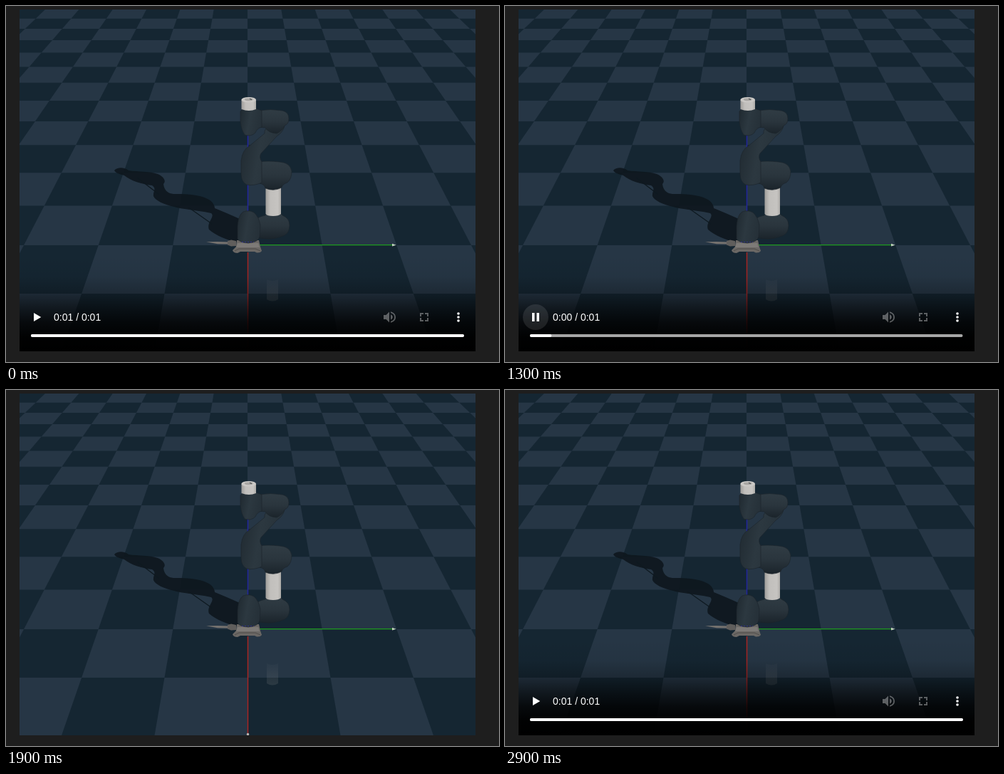
Animation of 692x500 px, one loop 4300 ms. Source, as an HTML page:

```html
<!DOCTYPE html>
<html lang="en">
<head>
<meta charset="utf-8">
<title>Robot arm player</title>
<style>
html, body { margin: 0; width: 100%; height: 100%; overflow: hidden; background: #1e1e1e; }
svg { display: block; width: 692px; height: 500px; }
text { font: 14px "Liberation Sans", Arial, sans-serif; fill: #fff; }
</style>
</head>
<body>
<svg viewBox="0 0 692 500" xmlns="http://www.w3.org/2000/svg">
  <defs>
    <clipPath id="view"><rect x="19" y="5" width="640" height="480"/></clipPath>
    <linearGradient id="shade" gradientUnits="userSpaceOnUse" x1="0" y1="350" x2="0" y2="485">
      <stop offset="0" stop-opacity="0"/>
      <stop offset=".22" stop-opacity=".05"/>
      <stop offset=".4" stop-opacity=".24"/>
      <stop offset=".55" stop-opacity=".55"/>
      <stop offset=".7" stop-opacity=".82"/>
      <stop offset=".85" stop-opacity=".97"/>
      <stop offset="1"/>
    </linearGradient>
    <linearGradient id="joint" x1="0" x2="1" y1="0" y2=".25">
      <stop offset="0" stop-color="#1f2930"/>
      <stop offset=".5" stop-color="#2c3840"/>
      <stop offset="1" stop-color="#263139"/>
    </linearGradient>
    <linearGradient id="limb" x1="0" x2="0" y1="0" y2="1">
      <stop offset="0" stop-color="#303c44"/>
      <stop offset=".5" stop-color="#2a353d"/>
      <stop offset="1" stop-color="#1b242b"/>
    </linearGradient>
    <linearGradient id="tube" x1="0" x2="1">
      <stop offset="0" stop-color="#a09e9b"/>
      <stop offset=".3" stop-color="#c1bfbc"/>
      <stop offset=".8" stop-color="#c6c4c1"/>
      <stop offset="1" stop-color="#adaba8"/>
    </linearGradient>
    <linearGradient id="mirror" x1="0" x2="0" y1="0" y2="1">
      <stop offset="0" stop-color="#b8b4ae" stop-opacity=".03"/>
      <stop offset="1" stop-color="#b8b4ae" stop-opacity=".14"/>
    </linearGradient>
  </defs>

  <g clip-path="url(#view)">
    <rect x="19" y="5" width="640" height="480" fill="#152632"/>
    <path id="tiles" fill="#263645"/>

    <!-- shadow on the floor -->
    <path fill="#0e171d" fill-opacity=".9" d="M152 231C156 226 166 226 172 231C186 233 202 232 213 236C222 240 225 246 221 250C222 258 226 263 235 264C250 264 270 264 283 271C291 275 293 281 293 284Q308 290 328 299L328 333C310 329 294 322 285 314C281 304 294 296 288 291C270 287 250 286 236 282C222 279 209 273 207 267C206 260 212 257 205 252C190 250 176 246 166 238C160 236 154 235 152 231Z"/>
    <path stroke="#0e1920" stroke-width="1.3" fill="none" d="M255 282L289 306M184 241L214 264"/>

    <!-- faint reflection -->
    <path fill="url(#mirror)" d="M366 384Q374 388 382 384V412Q374 417 366 412Z"/>

    <!-- axes -->
    <path stroke="#a82423" stroke-width="1.5" d="M339.5 346V483"/>
    <circle cx="339.5" cy="483.5" r="1.7" fill="#bdb6b2"/>
    <path stroke="#1f9a1f" stroke-width="1.4" d="M356 335.6H544"/>
    <path fill="#c4d4c0" d="M542 333.8L547.5 335.7L542 337.6Z"/>
    <path stroke="#22259c" stroke-width="1.5" d="M339.5 180V204M339.5 250V291"/>

    <!-- cable and base -->
    <path fill="#75726f" d="M281 331.2L297 331L313 331.5V334.5L297 334.2Z"/>
    <path fill="#605e5c" d="M311 330L316 328.5L323 330V337L316 337.5L311 335.5Z"/>
    <path fill="#6b6865" d="M324 329H355L357 338L359 344Q357 347 352 346.5L349 345H329L325 347Q319 347 318 343L323 338Z"/>
    <path fill="#7d7a77" d="M325 333H354L356 339H323Z"/>
    <path stroke="#504d4b" fill="none" d="M321 344L327 341H350L357 344"/>

    <g stroke="#1b242b" stroke-width=".6">
      <!-- shoulder -->
      <path fill="url(#limb)" d="M350 300Q357 295 364 294Q366 290 375 290Q386 290 388 294Q398 298 398 308Q398 318 391 322Q378 328 365 327Q356 327 350 323Z"/>
      <path fill="url(#joint)" d="M325 310Q326 293 333 289Q341 286 348 290Q355 296 357 308L356 324Q354 332 340 333Q327 332 325 327Z"/>
      <path stroke="#30308a" stroke-width="1" stroke-dasharray="2 2" d="M331 331.5H348"/>
      <path fill="url(#tube)" stroke="none" d="M364.5 254H386V292Q383 295 375 295Q366 295 364.5 292Z"/>

      <!-- elbow and forearm -->
      <path fill="url(#limb)" d="M355 219Q367 217 384 219Q399 220 401 232Q401 243 395 248Q388 250 387 255Q376 261 364 256Q363 250 355 249Z"/>
      <path fill="url(#joint)" d="M330 217Q332 202 341 197L363 179Q362 172 370 169H391Q388 178 380 183L358 207Q355 212 359 219V248Q348 253 338 251Q330 247 330 236Z"/>
      <path fill="none" d="M364 254Q375 259 387 253"/>

      <!-- wrist and tool cap -->
      <path fill="url(#limb)" d="M355 147Q371 144 388 147Q397 149 397 158Q397 166 391 168Q388 175 380 179Q368 178 364 171L355 170Z"/>
      <path fill="url(#joint)" d="M329 148Q331 144 340 144H351L359 147V170Q352 172 350 178Q344 184 335 181Q330 174 329 163Z"/>
    </g>
    <path fill="url(#tube)" d="M330.5 132H351V145Q341 149 330.5 145Z"/>
    <ellipse cx="340.7" cy="131.7" rx="10.3" ry="3.8" fill="#cbc9c6"/>
    <ellipse cx="340.7" cy="131.3" rx="6" ry="1.9" fill="#a7a5a2"/>
    <path stroke="#45484a" stroke-width="1.2" d="M342 130.3L345 131.5"/>

    <g id="controls">
      <rect x="19" y="350" width="640" height="135" fill="url(#shade)"/>
      <circle id="hover" cx="43" cy="437" r="18" fill="#fff" fill-opacity=".1"/>
      <path id="play" fill="#fff" d="M39 431L49.3 437L39 443Z"/>
      <path id="pause" fill="#fff" d="M38 431H41.5V443H38ZM44.5 431H48V443H44.5Z"/>
      <text id="clock" x="67" y="442"></text>
      <g fill="#fff" fill-opacity=".34">
        <path d="M530 434H533.5L538 429.5V444.5L533.5 440H530Z"/>
        <path d="M540 433.3Q542.8 434.6 542.8 437T540 440.7Z"/>
        <path d="M540 429.2Q547 431.2 547 437T540 444.8V443Q545.2 441.3 545.2 437T540 431Z"/>
        <path d="M581 431H586V433H583V436H581ZM588 431H593V436H591V433H588ZM581 438H583V441H586V443H581ZM591 438H593V443H588V441H591Z"/>
      </g>
      <g fill="#fff">
        <circle cx="635" cy="432" r="1.8"/><circle cx="635" cy="437" r="1.8"/><circle cx="635" cy="442" r="1.8"/>
      </g>
      <rect x="35" y="461" width="607.5" height="4" rx="2" fill="#a6a6a6"/>
      <rect id="bar" x="35" y="461" height="4" rx="2" fill="#fff"/>
      <circle id="thumb" cx="637" cy="463" r="6" fill="#fff"/>
    </g>
  </g>
</svg>
<script>
const LOOP = 4300, STEP = 100, BAR = 608;
const el = id => document.getElementById(id);
const show = (id, on) => el(id).setAttribute("visibility", on ? "visible" : "hidden");

// Floor in perspective: depth lines converge on the horizon
const HORIZON = -268.4;
const rowY = k => HORIZON + 5974.6 / (k + 8.886);
const colX = (c, y) => 339 + c * 0.1732 * (y - HORIZON);

function floorPath() {
  let d = "";
  for (let k = -1; k < 13; k++) {
    const near = rowY(k), far = rowY(k + 1);
    for (let c = -8; c < 8; c++) {
      if ((k + c) % 2 === 0) {
        const pts = [[c, near], [c + 1, near], [c + 1, far], [c, far]];
        d += "M" + pts.map(([i, y]) => colX(i, y).toFixed(1) + " " + y.toFixed(1)).join("L") + "Z";
      }
    }
  }
  return d;
}
el("tiles").setAttribute("d", floorPath());

function draw(time) {
  const t = Math.floor(time / STEP) * STEP;
  const playing = t >= 1300 && t < 2900;
  const fade = t >= 1300 && t < 2600 ? Math.max(0, 1 - (t - 1300) / 500) : 1;
  const progress = playing ? (Math.min(t, 2600) - 1212) / 1766 : 1;

  el("controls").setAttribute("opacity", fade);
  el("bar").setAttribute("width", BAR * progress);
  el("clock").textContent = (playing && t < 2300 ? "0:00" : "0:01") + " / 0:01";
  show("play", !playing);
  show("pause", playing);
  show("hover", t >= 900 && t < 2600);
  show("thumb", t >= 600 && t < 700);
}

const start = performance.now();
function tick() {
  draw((performance.now() - start) % LOOP);
  requestAnimationFrame(tick);
}
tick();
</script>
</body>
</html>
```
